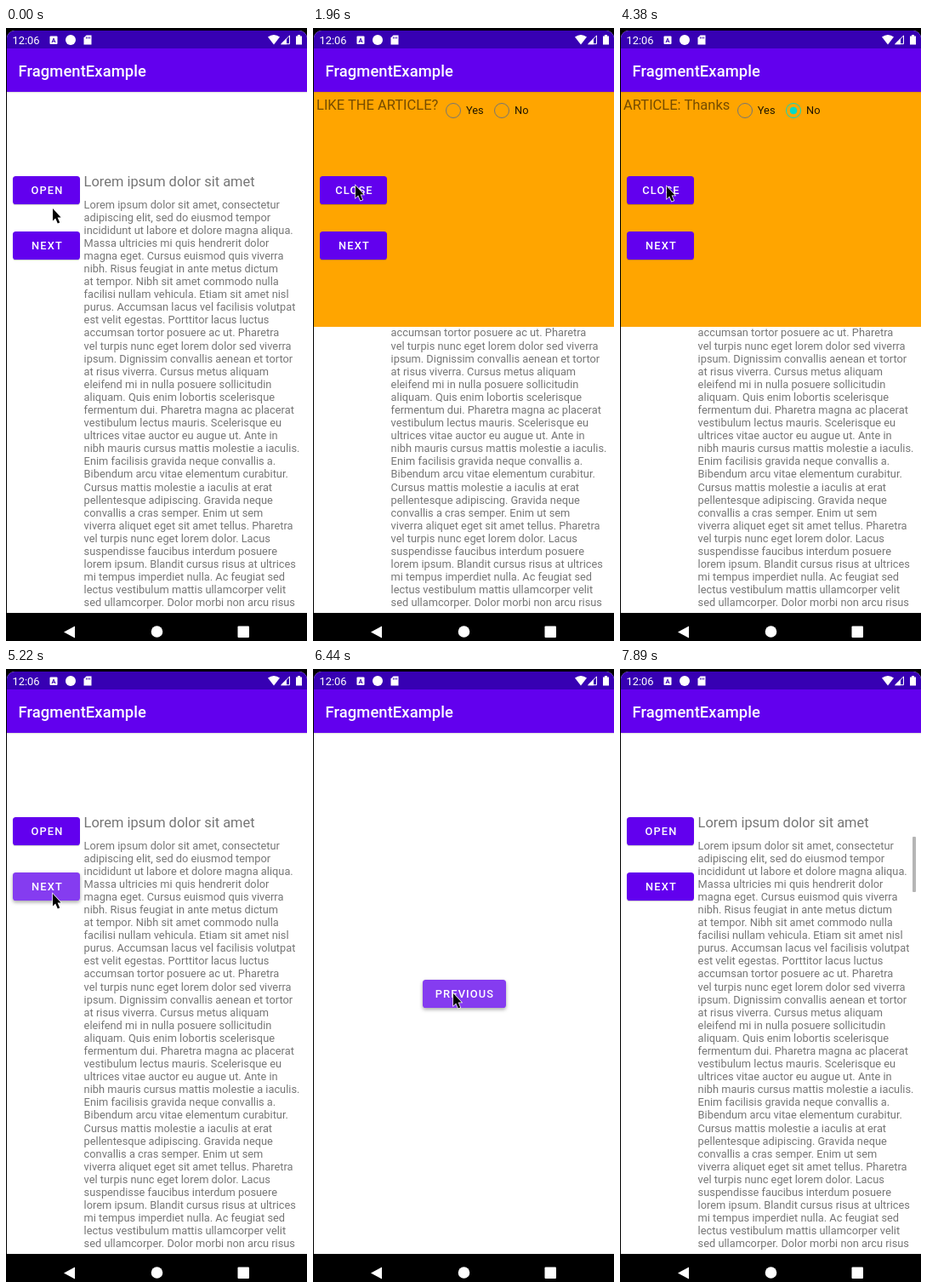
Animation of 354x720 px, one loop 8210 ms. Source, as an HTML page:

```html
<!DOCTYPE html>
<html lang="en">
<head>
<meta charset="utf-8">
<title>FragmentExample</title>
<style>
  html, body { margin: 0; width: 100%; height: 100%; overflow: hidden; background: #000; }
  #stage { position: absolute; left: 0; top: 0; width: 354px; height: 720px; overflow: hidden;
    font: 12.82px/15.1px Roboto, sans-serif; color: rgba(0,0,0,.54); white-space: pre; }
  #screen { position: absolute; inset: 0; clip-path: inset(3px 0 0 1px round 9px 9px 0 0); }
  .page, .page > *, #overlay { position: absolute; }
  .page { --accent: #6200ee; --status: #3700b3; left: 0; top: 0; width: 354px; height: 740px;
    background: #fff; clip-path: inset(3px 0 0 1px); transform-origin: 177.5px 372px; }
  .page.leaving { --accent: #10002c; filter: brightness(.9); }
  .status { left: 0; top: 0; width: 354px; height: 24px; background: var(--status); }
  .bar { left: 0; top: 24px; width: 339.4px; padding-left: 14.6px; height: 51px; background: var(--accent);
    color: #fff; font: 500 18.4px/53px Roboto, sans-serif; letter-spacing: .07px;
    box-shadow: 0 1px 1px rgba(0,0,0,.12); }
  .nav { left: 0; top: 687px; width: 354px; height: 60px; background: #000; }
  .button { box-sizing: border-box; width: 79px; height: 33px; padding-left: 2px; border-radius: 3.6px;
    background: var(--accent); color: #fff; font-weight: 500; line-height: 33px; letter-spacing: 1.15px;
    text-align: center; box-shadow: 0 1px 1px rgba(0,0,0,.2); }
  .button.pressed { background: #853cf0; box-shadow: 0 2px 4px rgba(0,0,0,.35); }
  .heading { left: 91.6px; top: 171px; font-size: 16.43px; line-height: 20px; }
  .copy { left: 91.6px; top: 199.5px; }
  .scrollbar { left: 344px; top: 197px; width: 4px; height: 65px; background: #b5b5b5; border-radius: 1px; }
  .article { left: 0; top: 75px; width: 350px; height: 270px; padding: 6px 0 0 4px; background: #ffa500; display: flex; }
  .answer { font-size: 16.5px; line-height: 20px; }
  .option { height: 32px; line-height: 32px; color: rgba(0,0,0,.87); display: flex; align-items: center; }
  .ring { box-sizing: border-box; width: 18px; height: 18px; margin: 0 6px 0 8.5px; border-radius: 50%;
    border: 1.9px solid #757575; }
  .option + .option .ring { margin-left: 12.5px; }
  .checked { border-color: #03dac5; background: radial-gradient(circle, #03dac5 4px, transparent 4.7px); }
  .filling { border: 5px solid #03dac5; background: none; }
  .ripple { box-shadow: 0 0 0 6px rgba(30,60,60,.24); background-color: rgba(30,60,60,.24); }
  #overlay { left: 0; top: 0; z-index: 5; }
</style>
</head>
<body>
<div id="stage">
  <div id="screen">
    <div class="page" id="main"><div class="status"></div><div class="heading">Lorem ipsum dolor sit amet</div><div class="copy">Lorem ipsum dolor sit amet, consectetur
adipiscing elit, sed do eiusmod tempor
incididunt ut labore et dolore magna aliqua.
Massa ultricies mi quis hendrerit dolor
magna eget. Cursus euismod quis viverra
nibh. Risus feugiat in ante metus dictum
at tempor. Nibh sit amet commodo nulla
facilisi nullam vehicula. Etiam sit amet nisl
purus. Accumsan lacus vel facilisis volutpat
est velit egestas. Porttitor lacus luctus
accumsan tortor posuere ac ut. Pharetra
vel turpis nunc eget lorem dolor sed viverra
ipsum. Dignissim convallis aenean et tortor
at risus viverra. Cursus metus aliquam
eleifend mi in nulla posuere sollicitudin
aliquam. Quis enim lobortis scelerisque
fermentum dui. Pharetra magna ac placerat
vestibulum lectus mauris. Scelerisque eu
ultrices vitae auctor eu augue ut. Ante in
nibh mauris cursus mattis molestie a iaculis.
Enim facilisis gravida neque convallis a.
Bibendum arcu vitae elementum curabitur.
Cursus mattis molestie a iaculis at erat
pellentesque adipiscing. Gravida neque
convallis a cras semper. Enim ut sem
viverra aliquet eget sit amet tellus. Pharetra
vel turpis nunc eget lorem dolor. Lacus
suspendisse faucibus interdum posuere
lorem ipsum. Blandit cursus risus at ultrices
mi tempus imperdiet nulla. Ac feugiat sed
lectus vestibulum mattis ullamcorper velit
sed ullamcorper. Dolor morbi non arcu risus</div><div class="scrollbar" id="scrollbar"></div>
      <div class="article" id="article"><span class="answer" id="answer"></span><span class="option"><i class="ring" id="yes"></i>Yes</span><span class="option"><i class="ring" id="no"></i>No</span></div>
      <div class="bar">FragmentExample</div>
      <div class="button" id="toggle" style="left:8px;top:174px"></div>
      <div class="button" id="next" style="left:8px;top:239px">NEXT</div>
      <div class="nav"></div>
    </div>
    <div class="page" id="second"><div class="status"></div><div class="bar">FragmentExample</div>
      <div class="button" id="previous" style="left:128.5px;top:365px;width:98px">PREVIOUS</div>
      <div class="nav"></div>
    </div>
  </div>
  <svg id="overlay" width="354" height="720" fill="#fff">
    <text x="7.5" y="18.6" font-size="12.9">12:06</text>
    <rect x="51.5" y="9.5" width="9" height="9.5" rx="1"/>
    <text x="56" y="17" font-size="7.5" font-weight="700" text-anchor="middle" fill="#3700b3">A</text>
    <circle cx="76" cy="14" r="6"/>
    <path d="M94.5 8.5H100.5V19.5H91.5V11.5Z"/>
    <path d="M94.5 10.5v2M96.5 10.5v2M98.5 10.5v2" stroke="#3700b3"/>
    <path d="M308 10.5Q315 5.500 322 10.5L315 19.5Z"/>
    <path d="M323.8 18.7L333.5 9V18.7Z" fill="none" stroke="#fff"/>
    <path d="M323 19.2L330 12.2V19.2Z"/>
    <path d="M341 9.5H343V8H346V9.5H348V19.5H341Z"/>
    <path d="M68 709.5L81 702.5V716.5Z"/>
    <circle cx="177.5" cy="709" r="6.8"/>
    <rect x="272.5" y="702.5" width="13.5" height="13.5" rx="1"/>
    <path id="cursor" d="M0 0V14.4L3.2 11.4L5.8 17.6L8.2 16.6L5.6 10.5H9.6Z" fill="#000" stroke="#fff" stroke-width="1.4" paint-order="stroke"/>
  </svg>
</div>
<script>
const LOOP = 8210, STEP = 120, OPEN_SECOND = 5344, OPEN_MAIN = 6733;
const el = id => document.getElementById(id);

const ticks = [[0, 1], [370, 1], [620, 1], [1120, 7], [1960, 1], [2700, 7], [3540, 7], [4380, 7],
  [5220, 5], [6070, 2], [6440, 6], [7410, 5]]
  .flatMap(([start, count]) => Array.from({ length: count }, (_, i) => start + i * STEP));

// Pointer path: [time, x, y].
const path = [[0, 55, 212], [370, 55, 211], [620, 60, 206], [1000, 60, 206], [1360, 50, 185],
  [2580, 50, 185], [3060, 184, 98], [3780, 184, 98], [4260, 73, 183], [4380, 55, 186],
  [4740, 55, 186], [5100, 55, 264], [5220, 55, 264], [5340, 56, 266], [5950, 56, 266],
  [6190, 165, 381], [7290, 165, 381], [7770, 321, 706], [7890, 360, 787], [LOOP, 360, 787]];

function pointerAt(t) {
  const i = path.findIndex(p => p[0] > t);
  const [t0, x0, y0] = path[i - 1], [t1, x1, y1] = path[i];
  const k = (t - t0) / (t1 - t0);
  return [x0 + (x1 - x0) * k, y0 + (y1 - y0) * k];
}

function layoutPages(t) {
  const onSecond = t >= OPEN_SECOND && t < OPEN_MAIN;
  const start = onSecond ? OPEN_SECOND : t >= OPEN_MAIN ? OPEN_MAIN : -LOOP;
  const p = 1 - Math.exp((start - t) / 50);
  const moving = p < .999;
  const [front, back] = onSecond ? [el('second'), el('main')] : [el('main'), el('second')];
  front.className = 'page';
  front.style.zIndex = 2;
  front.style.visibility = 'visible';
  front.style.transform = moving ? `scale(${.9 + .1 * p})` : 'none';
  back.className = 'page leaving';
  back.style.zIndex = 1;
  back.style.visibility = moving ? 'visible' : 'hidden';
  back.style.transform = `scale(${1 + .05 * p})`;
}

function draw() {
  const now = performance.now() % LOOP;
  const t = ticks.findLast(tick => tick <= now);
  const within = (from, to) => t >= from && t < to;
  const flag = (id, name, on) => el(id).classList.toggle(name, on);

  layoutPages(t);
  el('cursor').setAttribute('transform', `translate(${pointerAt(t)})`);

  el('toggle').textContent = within(1720, 4620) ? 'CLOSE' : 'OPEN';
  flag('toggle', 'pressed', within(1600, 1960) || within(4500, 4860));
  flag('next', 'pressed', within(5220, 5460));
  flag('previous', 'pressed', within(6440, 6720));

  el('article').style.display = within(1840, 4740) ? 'flex' : 'none';
  el('answer').textContent = t < 3300 ? 'LIKE THE ARTICLE?' : t < 3660 ? 'ARTICLE: Like' : 'ARTICLE: Thanks';
  for (const [id, chosen, end] of [['yes', 3300, 3660], ['no', 3660, LOOP]]) {
    flag(id, 'checked', within(chosen, end));
    flag(id, 'filling', within(chosen, chosen + STEP));
    flag(id, 'ripple', within(chosen - STEP, chosen + STEP));
  }
  el('scrollbar').style.display = t > OPEN_MAIN ? 'block' : 'none';
  requestAnimationFrame(draw);
}
draw();
</script>
</body>
</html>
```
